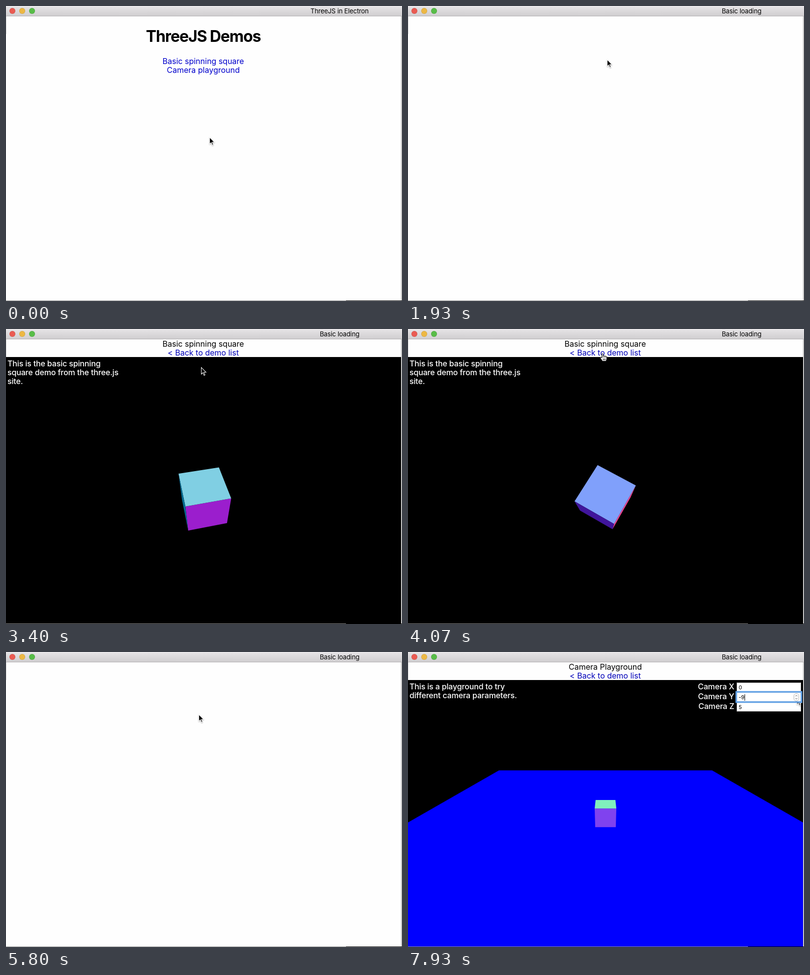
An HTML page with a canvas for the animation above (8000 ms loop, 806 by 600 pixels).

```html
<!DOCTYPE html>
<html lang="en">
<head>
<meta charset="utf-8">
<title>ThreeJS in Electron</title>
<style>
  html, body { margin: 0; width: 100%; height: 100%; overflow: hidden; background: #fefefe; }
  body { position: relative; font: 16px/18px Inter, "Open Sans", sans-serif; font-optical-sizing: none; color: #000; }
  [hidden] { display: none !important; }
  .bar, .dot, .name, .page, .edge, h1, .links, .head, .note, .field, .label, canvas, svg.cursor { position: absolute; }
  .bar { left: 0; top: 0; width: 806px; height: 20px; border-bottom: 1px solid #b3b1b3;
         background: linear-gradient(#f2f0f2 0, #e4e2e4 2px, #d0ced0 20px); }
  .dot { top: 4px; width: 12px; height: 12px; border-radius: 50%; box-shadow: inset 0 0 0 .5px rgba(0,0,0,.18); }
  .name { left: 579px; top: 2px; width: 200px; text-align: center; font-size: 13px; line-height: 17px; letter-spacing: -.1px; }
  .page { left: 0; top: 21px; width: 804px; height: 578px; overflow: hidden; }
  h1 { left: 0; top: 21px; width: 803px; margin: 0; text-align: center; font-size: 32px; line-height: 40px;
       font-weight: 700; letter-spacing: -1.1px; }
  .links { left: 0; top: 82px; width: 803px; text-align: center; color: #0000cc; }
  .head { left: 0; top: 0; width: 803px; height: 36px; text-align: center; }
  .head i { font-style: normal; color: #0000b8; }
  canvas { left: 0; top: 36px; }
  .note, .label { color: #fff; font-weight: 500; letter-spacing: -.15px; white-space: pre; }
  .note { left: 3px; top: 40px; }
  .label { right: 140px; }
  .field { left: 669px; width: 126px; height: 17px; padding-left: 3px; border: 1px solid #c6c6c6; border-top-color: #9c9c9c;
           background: #fff; font-size: 11px; line-height: 18px; }
  .field.focus { border-color: #86b4e6; box-shadow: 0 0 0 2.5px #5f9fe4; z-index: 1; }
  .caret { display: inline-block; width: 1px; height: 13px; background: #000; vertical-align: -3px; }
  .field svg { position: absolute; right: 3px; top: 1px; }
  .edge { background: #a9a9a9; }
  svg.cursor { left: 0; top: 0; overflow: visible; width: 1px; height: 1px; }
</style>
</head>
<body>
<div class="bar">
  <div class="dot" style="left:7px;background:#ea5b52"></div>
  <div class="dot" style="left:27px;background:#edb844"></div>
  <div class="dot" style="left:47px;background:#58bd48"></div>
  <div class="name" id="name"></div>
</div>

<div class="page" id="menu">
  <h1>ThreeJS Demos</h1>
  <div class="links">Basic spinning square<br>Camera playground</div>
</div>

<div class="page" id="demo" hidden>
  <div class="head"><span id="head"></span><br><i>&lt; Back to demo list</i></div>
  <canvas id="scene" width="804" height="542"></canvas>
  <div class="note" id="note"></div>
  <div id="form">
    <div class="label" style="top:40px">Camera X</div><div class="field" style="top:41px">0</div>
    <div class="label" style="top:60px">Camera Y</div>
    <div class="field" id="fieldY" style="top:61px"><span id="valueY"></span><span class="caret" id="caret"></span>
      <svg id="spinner" width="11" height="16" fill="none" stroke="#555">
        <rect x=".5" y=".5" width="10" height="15" rx="4.5" fill="#fff" stroke="#b5b5b5"/>
        <path d="M3.5 6 5.5 4l2 2M3.5 10l2 2 2-2"/>
      </svg>
    </div>
    <div class="label" style="top:80px">Camera Z</div><div class="field" style="top:81px">5</div>
  </div>
</div>

<div class="edge" style="left:0;top:21px;width:1px;height:36px;background:#d8d8d8"></div>
<div class="edge" style="left:804px;top:21px;width:1px;height:579px"></div>
<div class="edge" style="left:805px;top:21px;width:1px;height:579px;background:#e6e6e6"></div>
<div class="edge" style="left:0;top:599px;width:806px;height:1px;background:#8c8c8c"></div>
<div class="edge" style="left:692px;top:599px;width:114px;height:1px;background:#000"></div>

<svg class="cursor" id="arrow">
  <path d="M0 0V16L3.6 12.7 5.8 17.9 8.7 16.7 6.6 11.6H11.4Z" fill="#fff" style="filter:drop-shadow(0 1px 1px rgba(0,0,0,.35))"/>
  <path d="M1 2.4V13.6L4 10.9 6.3 16.4 7.4 15.9 5.1 10.5H9Z"/>
</svg>
<svg class="cursor" id="hand" fill="#fff" stroke="#000" stroke-linejoin="round" stroke-linecap="round">
  <path d="M-2.5 8.5V1.2C-2.5-.4 0-.4 0 1.2V5C.4 3.9 2.6 4 2.7 5.3 3.2 4.4 5.2 4.6 5.3 5.9 5.9 5.2 7.5 5.5 7.5 7V10C7.5 12 6.5 12.6 6.2 15.5H-1.5C-2 13-4.3 11.5-5.2 9.3-5.8 7.8-4 6.8-2.5 8.5Z"/>
  <path d="M0 5V8M2.7 5.5V8M5.3 6V8.2M.2 10.5V13.5M2.3 10.5V13.5M4.4 10.5V13.5" stroke-width=".9"/>
</svg>
<svg class="cursor" id="beam" fill="none">
  <path d="M-3-7Q0-7 0-5Q0-7 3-7M0-5V6M-3 7.5Q0 7.5 0 5.5Q0 7.5 3 7.5M-2 2.5H2" stroke="#fff" stroke-opacity=".7" stroke-width="2.4"/>
  <path d="M-3-7Q0-7 0-5Q0-7 3-7M0-5V6M-3 7.5Q0 7.5 0 5.5Q0 7.5 3 7.5M-2 2.5H2" stroke="#000" stroke-width="1.1"/>
</svg>

<script>
const LOOP = 8000;
const FOCAL = 271 / 271 * 289 / Math.tan(35 * Math.PI / 180);   // 70 degree lens
const $ = id => document.getElementById(id);
const ctx = $('scene').getContext('2d');

// start time and page
const PAGES = [[0, 'menu'], [1670, 'blank'], [1990, 'spin'], [4130, 'clear'], [4330, 'menu'], [5670, 'blank'], [5950, 'camera']];

// time, x, y of the pointer's hot spot
const PATH = [
  [0, 414, 266], [70, 414, 266], [270, 413, 262], [530, 413, 262], [1330, 405, 108],
  [3130, 405, 108], [3400, 397, 77], [3800, 397, 50], [4400, 397, 50], [4800, 393, 133],
  [5070, 392, 126], [6050, 392, 126], [6470, 645, 81], [6600, 720, 95], [6730, 751, 94],
  [7000, 751, 94], [7470, 791, 92], [LOOP, 791, 92]
];
const CLICK = 7800;

function pointerAt(t) {
  const i = PATH.findIndex(p => p[0] > t);
  const [t0, x0, y0] = PATH[i - 1], [t1, x1, y1] = PATH[i];
  let k = (t - t0) / (t1 - t0);
  k = k * k * (3 - 2 * k);
  return [x0 + (x1 - x0) * k, y0 + (y1 - y0) * k];
}

const inside = (x, y, l, t, r, b) => x >= l && x < r && y >= t && y < b;

function pointerKind(page, x, y) {
  if (page === 'menu' && (inside(x, y, 319, 103, 485, 121) || inside(x, y, 328, 121, 476, 139))) return 'hand';
  if ((page === 'spin' || page === 'camera') && inside(x, y, 330, 39, 475, 57)) return 'hand';
  if (page === 'camera' && inside(x, y, 591, 62, 784, 121)) return 'beam';
  return 'arrow';
}

function polygon(points, color) {
  ctx.fillStyle = color;
  ctx.beginPath();
  for (const [x, y, z] of points) ctx.lineTo(402 - FOCAL * x / z, 289 + FOCAL * y / z);
  ctx.fill();
}

// unit cube shaded by its view-space normals
function cube(turn, [ox, oy, oz]) {
  for (let axis = 0; axis < 3; axis++) for (const side of [-1, 1]) {
    const point = (u, v) => {
      const p = [0, 0, 0];
      p[axis] = side / 2;
      p[(axis + 1) % 3] = u / 2;
      p[(axis + 2) % 3] = v / 2;
      const [x, y, z] = turn(p);
      return [x + ox, y + oy, z + oz];
    };
    const unit = [0, 0, 0];
    unit[axis] = side;
    const n = turn(unit), c = point(0, 0);
    if (n[0] * c[0] + n[1] * c[1] + n[2] * c[2] >= 0) continue;
    const rgb = n.map(v => Math.round(127.5 + 127.5 * v));
    polygon([point(-1, -1), point(1, -1), point(1, 1), point(-1, 1)], `rgb(${rgb})`);
  }
}

function drawSpin(t) {
  const steps = 32 + (t - 2470) * 0.0618;
  const a = steps * 0.01, b = steps * 0.02;
  const turn = ([x, y, z]) => {
    const x1 = x * Math.cos(b) + z * Math.sin(b), z1 = z * Math.cos(b) - x * Math.sin(b);
    return [x1, y * Math.cos(a) - z1 * Math.sin(a), y * Math.sin(a) + z1 * Math.cos(a)];
  };
  cube(turn, [0, 0, -5]);
}

function drawCamera(camY) {
  const d = Math.hypot(camY, 5), c = -camY / d, s = 5 / d;
  const turn = ([x, y, z]) => [x, s * y + c * z, s * z - c * y];
  const place = p => { const [x, y, z] = turn(p); return [x, y, z - d]; };
  polygon([[-10, 10, 0], [10, 10, 0], [10, -7, 0], [-10, -7, 0]].map(place), '#00f');
  cube(turn, place([0, 0, 0.5]));
}

function setText(id, text) {
  if ($(id).textContent !== text) $(id).textContent = text;
}

function render(t) {
  const page = PAGES.filter(p => p[0] <= t).pop()[1];
  const spin = page === 'spin', camera = page === 'camera';
  const [x, y] = pointerAt(t), kind = pointerKind(page, x, y);

  setText('name', page === 'menu' || page === 'clear' ? 'ThreeJS in Electron' : 'Basic loading');
  $('menu').hidden = page !== 'menu';
  $('demo').hidden = !spin && !camera;
  $('form').hidden = !camera;

  if (spin || camera) {
    setText('head', spin ? 'Basic spinning square' : 'Camera Playground');
    setText('note', spin ? 'This is the basic spinning\nsquare demo from the three.js\nsite.'
                         : 'This is a playground to try\ndifferent camera parameters.');
    ctx.fillStyle = '#000';
    ctx.fillRect(0, 0, 804, 542);
  }
  if (spin) drawSpin(t);
  if (camera) {
    const clicked = t >= CLICK, camY = clicked ? -9 : -8;
    drawCamera(camY);
    setText('valueY', String(camY));
    $('caret').hidden = !clicked;
    $('fieldY').classList.toggle('focus', clicked);
    $('spinner').style.visibility = inside(x, y, 669, 82, 800, 102) ? 'visible' : 'hidden';
  }

  for (const id of ['arrow', 'hand', 'beam']) $(id).style.display = id === kind ? '' : 'none';
  $(kind).style.transform = `translate(${Math.round(x)}px, ${Math.round(y)}px)`;
}

const start = performance.now();
function tick() {
  render((performance.now() - start) % LOOP);
  requestAnimationFrame(tick);
}
tick();
</script>
</body>
</html>
```
